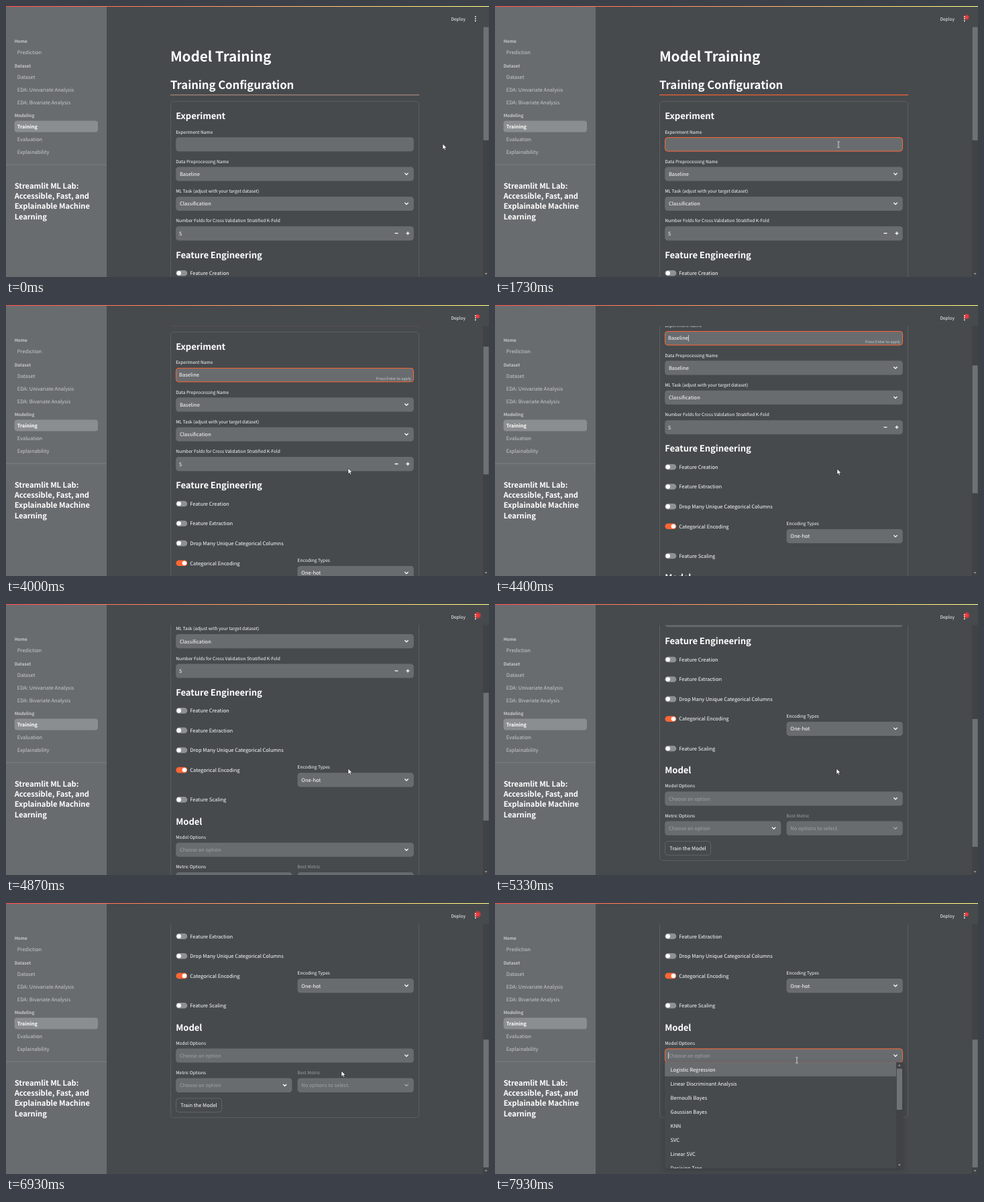
Write an HTML page that moves like this. It is 720 by 405 pixels and loops after 8 s.

```html
<!DOCTYPE html>
<html lang="en">
<head>
<meta charset="utf-8">
<title>Model Training</title>
<style>
  html, body { margin: 0; width: 100%; height: 100%; overflow: hidden; background: #464a4d; }
  svg { display: block; width: 720px; height: 405px; }
  text {
    font-family: "Noto Sans CJK JP", "Noto Sans CJK SC", "Noto Sans CJK", "Open Sans", sans-serif;
    text-rendering: geometricPrecision; white-space: pre; fill: #fff;
  }
  .bold { font-weight: 700; }
  .heading { font-weight: 700; letter-spacing: -.005em; }
  .dim { fill: #c9cbcc; }
  .faint { fill: #9fa2a4; }
  .field { fill: #696c6f; }
  .icon { fill: none; stroke: #fff; stroke-width: 1.3; stroke-linecap: round; stroke-linejoin: round; }
  .off { opacity: .4; }
  #menu { filter: drop-shadow(0 2px 4px rgba(0, 0, 0, .2)); }
</style>
</head>
<body>
<svg id="stage" viewBox="0 0 720 405"></svg>
<script>
const LOOP = 8000, ORANGE = '#fb6534', BG = '#464a4d';
const NOTCH = 52.7, MAX_SCROLL = 379;
const FONT_SCALE = 0.472; // page px to stage px, adjusted for the font's Latin size

// ---- drawing helpers (all return SVG markup) ----
const text = (x, y, str, size = 16, cls = '', extra = '') =>
  `<text x="${x}" y="${y}" font-size="${(size * FONT_SCALE).toFixed(2)}" class="${cls}" ${extra}>${str}</text>`;
const rect = (x, y, w, h, fill, r = 0, extra = '') =>
  `<rect x="${x}" y="${y}" width="${w}" height="${h}" rx="${r}" fill="${fill}" ${extra}/>`;
const chevron = (x, y, cls = '') =>
  `<path class="icon ${cls}" d="M${x - 2.3} ${y - 1.1}l2.3 2.3l2.3-2.3"/>`;
const label = (x, y, str, cls) => text(x, y, str, 14, cls);
const field = (x, y, w) => `<rect class="field" x="${x}" y="${y}" width="${w}" height="21.1" rx="4.2"/>`;
const focusRing = (id, y) =>
  rect(253.5, y + .4, 354, 20.4, 'none', 4, `id="${id}" stroke="${ORANGE}" stroke-width="1"`);
const select = (x, y, w, value, valueCls = '', iconCls = '') =>
  field(x, y, w) + text(x + 5.7, y + 13.4, value, 16, valueCls) + chevron(x + w - 10.8, y + 10.5, iconCls);
const toggle = (y, str, on) =>
  rect(253.4, y - 4.3, 16.9, 8.6, on ? ORANGE : '#8e9193', 4.3) +
  `<circle cx="${on ? 266 : 257.7}" cy="${y}" r="3.3" fill="#fff"/>` + text(274.3, y + 2.8, str);
const arrowhead = (x, y, dir) =>
  `<path d="M${x - 2} ${y - dir}h4l-2 ${2.2 * dir}z" fill="#a4a6a7"/>`;

// ---- page parts ----
const form = `
  ${text(245, 83.3, 'Model Training', 44, 'heading')}
  ${text(245, 124, 'Training Configuration', 35.6, 'heading')}
  ${rect(245, 132.3, 371, 1.2, ORANGE, 0, 'id="divider"')}
  ${rect(245.5, 142.6, 370, 557, 'none', 4.2, 'stroke="#64686b" stroke-width=".7"')}
  ${text(253.2, 169, 'Experiment', 27.7, 'heading')}
  ${label(253.2, 190.5, 'Experiment Name')}
  ${field(253.2, 196.2, 354.6)}
  <g id="name-focus">${focusRing('name-ring', 196.2)}</g>
  ${text(258, 209.6, '', 16, '', 'id="name"')}
  ${rect(258, 202, .7, 9.4, '#fff', 0, 'id="name-caret"')}
  ${text(604, 214.4, 'Press Enter to apply', 12, 'dim', 'id="hint" text-anchor="end"')}
  ${label(253.2, 234.8, 'Data Preprocessing Name')}
  ${select(253.2, 240.5, 354.6, 'Baseline')}
  ${label(253.2, 279.1, 'ML Task (adjust with your target dataset)')}
  ${select(253.2, 284.9, 354.6, 'Classification')}
  ${label(253.2, 323.4, 'Number Folds for Cross Validation Stratified K-Fold')}
  ${field(253.2, 329.3, 354.6)}
  ${text(258, 342.7, '5')}
  <path class="icon" d="M580 339.7h4M597 339.7h4M599 337.7v4"/>
  ${text(253.2, 376.5, 'Feature Engineering', 27.7, 'heading')}
  ${toggle(399.2, 'Feature Creation')}
  ${toggle(428.7, 'Feature Extraction')}
  ${toggle(458.3, 'Drop Many Unique Categorical Columns')}
  ${toggle(487.9, 'Categorical Encoding', true)}
  ${label(434.6, 486.2, 'Encoding Types')}
  ${select(434.6, 492.1, 173.2, 'One-hot')}
  ${toggle(532.2, 'Feature Scaling')}
  ${text(253.2, 569.5, 'Model', 27.7, 'heading')}
  ${label(253.2, 590.7, 'Model Options')}
  ${select(253.2, 596.5, 354.6, 'Choose an option', 'faint')}
  <g id="model-focus">${focusRing('model-ring', 596.5)}
    ${rect(258.2, 602.2, .7, 9.6, '#fff', 0, 'id="model-caret"')}</g>
  ${label(253.2, 635, 'Metric Options')}
  ${label(434.6, 635, 'Best Metric', 'faint')}
  ${select(253.2, 640.8, 173.2, 'Choose an option', 'faint')}
  ${select(434.6, 640.8, 173.2, 'No options to select.', 'faint', 'off')}
  ${rect(253.6, 670.9, 68, 20.6, BG, 4, 'stroke="#6c7073" stroke-width=".7"')}
  ${text(287.5, 684, 'Train the Model', 16, '', 'text-anchor="middle"')}`;

const models = ['Logistic Regression', 'Linear Discriminant Analysis', 'Bernoulli Bayes',
  'Gaussian Bayes', 'KNN', 'SVC', 'Linear SVC', 'Decision Tree'];
const menu = `
  ${rect(253.2, 238, 354.6, 158.6, BG, 3)}
  ${rect(253.2, 238, 345, 21.1, '#696c6f')}
  <g clip-path="url(#menu-clip)">
    ${models.map((name, i) => text(261.5, 251.7 + i * 21.1, name)).join('')}
  </g>
  ${rect(598.2, 238, 9.4, 158.6, '#404243')}
  ${rect(598.8, 247.5, 8.2, 61.5, '#707375')}
  ${arrowhead(602.9, 242.5, -1)}${arrowhead(602.9, 391.5, 1)}`;

const navHeads = [[52, 'Home'], [89, 'Dataset'], [163, 'Modeling']];
const navItems = [[69.5, 'Prediction'], [106, 'Dataset'], [125, 'EDA: Univariate Analysis'],
  [144, 'EDA: Bivariate Analysis'], [199.2, 'Evaluation'], [218.2, 'Explainability']];
const tagline = ['Streamlit ML Lab:', 'Accessible, Fast, and', 'Explainable Machine', 'Learning'];
const sidebar = `
  ${rect(0, 0, 150, 405, '#696c6f')}
  ${navHeads.map(([y, s]) => text(12.7, y + 2.6, s, 13.8, 'bold dim')).join('')}
  ${navItems.map(([y, s]) => text(16.8, y + 2.8, s, 16, 'dim')).join('')}
  ${rect(12.7, 171.6, 124.3, 16.9, '#8b8e90', 4)}
  ${text(16.8, 183.1, 'Training', 15.7, 'bold')}
  ${rect(0, 236.6, 150, .7, '#858789')}
  ${tagline.map((s, i) => text(12.7, 273 + i * 15.18, s, 23.7, 'heading')).join('')}`;

const header = `
  ${rect(150, 0, 570, 31.6, BG)}
  ${text(663.4, 21.6, 'Deploy', 14)}
  <circle id="halo" cx="703" cy="17" fill="#f33" opacity=".55"/>
  <circle id="record" cx="703" cy="17" r="2.8" fill="#f03a3a"/>
  ${[15.9, 19.1, 22.3].map(y => `<circle cx="699.8" cy="${y}" r=".95" fill="#fff"/>`).join('')}`;

const stage = document.getElementById('stage');
stage.innerHTML = `
  <defs>
    <linearGradient id="rainbow"><stop stop-color="#ff4b4b"/><stop offset="1" stop-color="#fffd80"/></linearGradient>
    <clipPath id="menu-clip"><rect x="253" y="238" width="345" height="158.4"/></clipPath>
  </defs>
  ${rect(0, 0, 720, 405, BG)}
  <g id="form">${form}</g>
  ${rect(711, 0, 9, 405, '#404243')}
  ${rect(711.6, 0, 8, 191, '#6f7274', 0, 'id="thumb"')}
  ${arrowhead(715.5, 400.3, 1)}
  <g id="menu">${menu}</g>
  ${header}${sidebar}
  ${rect(0, 0, 720, 1.1, 'url(#rainbow)')}
  <path id="arrow" d="M0 0V8.4L2 6.6L3.3 9.5L4.7 8.9L3.4 6.1H6Z" fill="#fff" stroke="#111" stroke-width=".5"/>
  <path id="beam" d="M-1.8-4.2H-.5L0-3.8L.5-4.2H1.8M0-3.8V3.8M-1.8 4.2H-.5L0 3.8L.5 4.2H1.8"
    fill="none" stroke="#d8dadb" stroke-width=".9"/>`;

// ---- motion ----
const $ = id => document.getElementById(id);
const show = (id, on) => { $(id).style.display = on ? '' : 'none'; };
const clamp = v => Math.max(0, Math.min(1, v));
const ease = p => (1 - Math.cos(Math.PI * clamp(p))) / 2;

const FOCUS = 1200, TYPE_START = 2300, KEY = 130, OPEN = 7470;
const WORD = 'Baseline';
const wheelTimes = [3500, 3816, 4200, 4480, 4754, 5080, 6480, 6700];
const pointerPath = [[0, 651, 206], [250, 651, 206], [1050, 512, 207], [2700, 512, 207], [3300, 511, 244],
  [4000, 510, 244], [4870, 510, 246], [5330, 509, 246], [6300, 507, 247], [6930, 500, 251],
  [7300, 450, 235], [LOOP, 450, 235]];

const scrollAt = t =>
  Math.min(MAX_SCROLL, wheelTimes.reduce((sum, start) => sum + NOTCH * ease((t - start) / 220), 0));

function pointerAt(t) {
  const i = pointerPath.findIndex(([time]) => time > t);
  const [t0, x0, y0] = pointerPath[i - 1], [t1, x1, y1] = pointerPath[i];
  const p = ease((t - t0) / (t1 - t0));
  return [x0 + (x1 - x0) * p, y0 + (y1 - y0) * p];
}

const blink = (t, since) => t >= since && (t - since) % 1000 < 500;

function draw(t) {
  const scroll = scrollAt(t);
  $('form').setAttribute('transform', `translate(0 ${-scroll})`);
  $('thumb').setAttribute('y', 9.7 + scroll * .513);
  $('divider').setAttribute('fill', t < 270 ? '#a98b7d' : ORANGE);

  const typed = Math.max(0, Math.min(WORD.length, Math.floor((t - TYPE_START) / KEY) + 1));
  const lastKey = typed ? TYPE_START + (typed - 1) * KEY : FOCUS;
  const name = $('name');
  name.textContent = WORD.slice(0, typed);
  $('name-caret').setAttribute('x', 258 + (typed ? name.getComputedTextLength() : 0));
  show('name-caret', t < OPEN && blink(t, lastKey));
  show('name-focus', t >= FOCUS && t < OPEN);
  show('hint', typed > 0);

  show('menu', t >= OPEN);
  show('model-focus', t >= OPEN);
  show('model-caret', blink(t, OPEN));

  show('record', t >= 70);
  show('halo', t >= 70);
  $('halo').setAttribute('r', 2.8 + 2.2 * Math.sin(Math.PI * (t % 2000) / 2000));

  const [x, y] = pointerAt(t);
  const overText = (x < 607 && t < 3600) || (t > 7000 && y < 238.6);
  show('arrow', !overText);
  show('beam', overText);
  $(overText ? 'beam' : 'arrow').setAttribute('transform', `translate(${x} ${y})`);
}

function frame() {
  draw(performance.now() % LOOP);
  requestAnimationFrame(frame);
}
frame();
</script>
</body>
</html>
```
